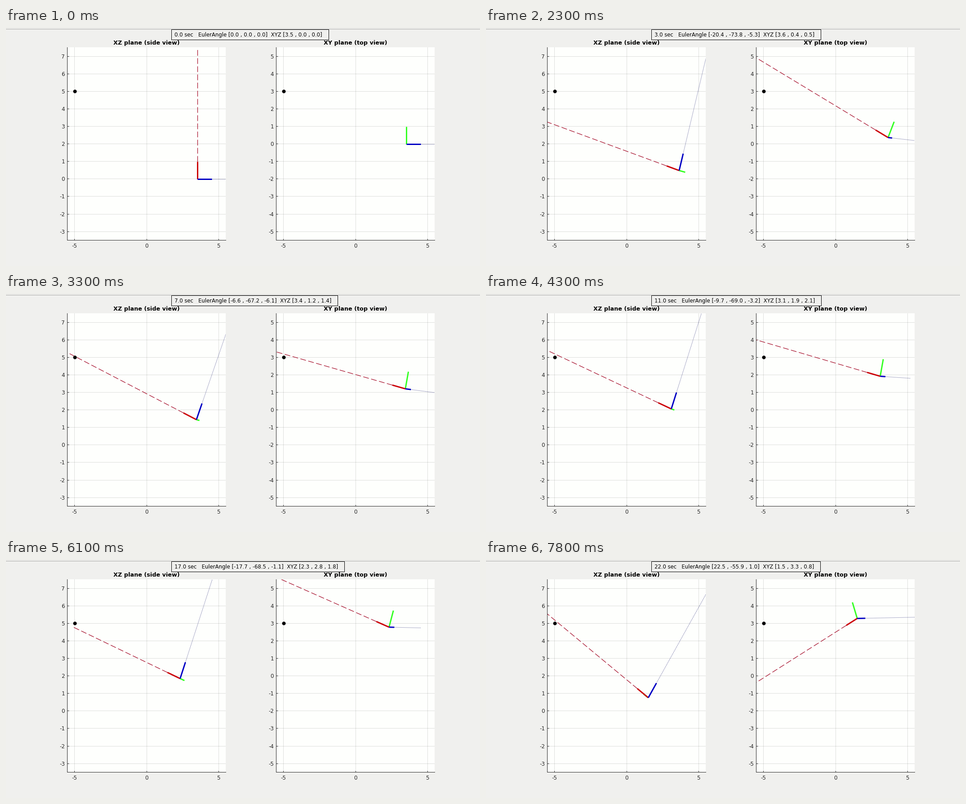
Write a matplotlib script that moves like this. It is 1055 by 531 pixels and loops after 8 s.

```python
import numpy as np
import matplotlib.pyplot as plt
from matplotlib.animation import FuncAnimation
from matplotlib.lines import Line2D
from matplotlib.patches import Rectangle
from matplotlib.transforms import ScaledTranslation

plt.rcParams["font.family"] = "DejaVu Sans"
plt.rcParams["lines.scale_dashes"] = False

W, H, DPI = 1055, 531, 72
FRAMES, STEP_MS = 80, 100
PAPER, PANEL, INK = "#f0f0ee", "#fefffd", "#262626"
RED, GREEN, BLUE = "#cc0008", "#33ff22", "#0000c4"
LASER, NAVY = "#a8142f", "#000060"

LOW = np.array([-5.5, -5.5, -3.5])
HIGH = np.array([5.5, 5.5, 7.5])
TARGET = np.array([-5, 3, 5])

# Playback starts slowly, then runs at a nearly steady pace.
PACE_MS = [0, 1400, 2000, 2300, 2400, 2676, 4788, 5095, 7735]
PACE_S = [0, 1, 2, 3, 4, 5, 13, 14, 22]

# Key attitudes: second, roll, pitch, yaw (degrees).
POSES = np.array([
    (0, 0, 0, 0),
    (1, 14.9, -48.6, -2),
    (2, 16, -65.2, -4),
    (3, -20.4, -73.8, -5.3),
    (5, -9.4, -74.3, -6.3),
    (7, -6.6, -67.2, -6.1),
    (11, -9.7, -69, -3.2),
    (14, -23.6, -68.6, -1.9),
    (17, -17.7, -68.5, -1.1),
    (20, 34.6, -68.5, .5),
    (21, 45, -59.2, .6),
    (22, 22.5, -55.9, 1)])


def attitude(t):
    return [np.interp(t, POSES[:, 0], col) for col in POSES[:, 1:].T]


def position(t):
    """Circular climb and descent, with a lag that dies out after the start."""
    radius = 3.5 + .17 * (1 - np.exp(-t)) - .003 * t
    lag = 1.6 * (1 - np.exp(-t)) + 3.4 * t * np.exp(-t / 1.8)
    turn = np.radians(3.05 * t - lag)
    height = (2.16 * np.cos(np.radians(7.72 * (t - 13)))
              + (.3885 - .1275 * t) * np.exp(-t / 3))
    return np.array([radius * np.cos(turn), radius * np.sin(turn), height])


def rotation(roll, pitch, yaw):
    cr, cp, cy = np.cos(np.radians([roll, pitch, yaw]))
    sr, sp, sy = np.sin(np.radians([roll, pitch, yaw]))
    return np.array([
        [cy * cp, cy * sp * sr - sy * cr, cy * sp * cr + sy * sr],
        [sy * cp, sy * sp * sr + cy * cr, sy * sp * cr - cy * sr],
        [-sp, cp * sr, cp * cr]])


def ray_end(p, d):
    """Point where a ray from p along d leaves the plot volume."""
    reach = [((HIGH if c > 0 else LOW)[i] - p[i]) / c
             for i, c in enumerate(d) if abs(c) > 1e-9]
    return p + min(reach) * d


fig = plt.figure(figsize=(W / DPI, H / DPI), dpi=DPI, facecolor=PAPER)
page = fig.add_axes([0, 0, 1, 1])
page.set(xlim=(0, W), ylim=(H, 0))
page.axis("off")
page.add_line(Line2D([0, W], [2, 2], color="#a9a9a8", lw=1))


class View:
    """One orthographic panel showing two of the three coordinates."""

    def __init__(self, left, title, dims):
        self.dims = list(dims)
        ax = fig.add_axes([left / W, 1 - 473.2 / H, 353.1 / W, 430 / H],
                          facecolor=PANEL)
        i, j = self.dims
        ax.set(xlim=(LOW[i], HIGH[i]), ylim=(LOW[j], HIGH[j]))
        ys = range(int(np.ceil(LOW[j])), int(HIGH[j]) + 1)
        ax.set_xticks([-5, 0, 5], ["-5", "0", "5"])
        ax.set_yticks(ys, [str(y) for y in ys])
        ax.tick_params(direction="in", length=3.5, width=1, color=INK,
                       labelcolor=INK, labelsize=11.9)
        ax.tick_params(axis="x", pad=7.3)
        ax.tick_params(axis="y", pad=5.3)
        ax.grid(color=INK, alpha=.15, lw=1)
        ax.set_axisbelow(True)
        ax.spines[["top", "right"]].set_visible(False)
        for side in ("left", "bottom"):
            ax.spines[side].set(color=INK, linewidth=1)
        page.text(left + 176.5, 37, title, size=12.75, weight="bold",
                  ha="center")

        # Data is drawn through pixel centres, as the grid is.
        centred = ax.transData + ScaledTranslation(
            .4 / DPI, -.4 / DPI, fig.dpi_scale_trans)

        def line(color, lw, **kw):
            return ax.plot([], [], color=color, lw=lw, transform=centred,
                           **kw)[0]

        self.laser = line(LASER, 1.3, dashes=(12.8, 5.4),
                          dash_capstyle="butt")
        self.sight = line(NAVY, 1, dashes=(1, 2), dash_capstyle="butt")
        self.arms = [line(c, 3, solid_capstyle="butt", zorder=z)
                     for c, z in ((BLUE, 5), (GREEN, 3), (RED, 4))]
        ax.plot(*TARGET[self.dims], "o", ms=8, color="black", mew=0,
                zorder=6, transform=centred)
        ax.set(xlim=(LOW[i], HIGH[i]), ylim=(LOW[j], HIGH[j]))

    def segment(self, line, a, b):
        i, j = self.dims
        line.set_data([a[i], b[i]], [a[j], b[j]])

    def update(self, p, rot):
        tips = p + rot.T
        for arm, tip in zip(self.arms, tips):
            self.segment(arm, p, tip)
        self.segment(self.sight, tips[0], ray_end(p, rot[:, 0]))
        self.segment(self.laser, tips[2], ray_end(p, rot[:, 2]))


views = [View(136.3, "XZ plane (side view)", (0, 2)),
         View(601.3, "XY plane (top view)", (0, 1))]
frame_box = page.add_patch(Rectangle((368.2, 3.2), 1, 23.2, fc="none",
                                     ec="black", lw=1))
info = page.text(375, 18.7, "", size=11.64)


def triple(values):
    return "[" + " , ".join(f"{v:.1f}" for v in values) + "]"


def update(frame):
    t = int(np.interp(frame * STEP_MS, PACE_MS, PACE_S))
    p, angles = position(t), attitude(t)
    rot = rotation(*angles)
    for view in views:
        view.update(p, rot)
    info.set_text(f"{t:.1f} sec   EulerAngle {triple(angles)}"
                  f"  XYZ {triple(p)}")
    frame_box.set_width(info.get_window_extent().x1 + 14 - 368.2)


anim = FuncAnimation(fig, update, frames=FRAMES, interval=STEP_MS,
                     repeat=True, repeat_delay=0, blit=False)
plt.show()
```
